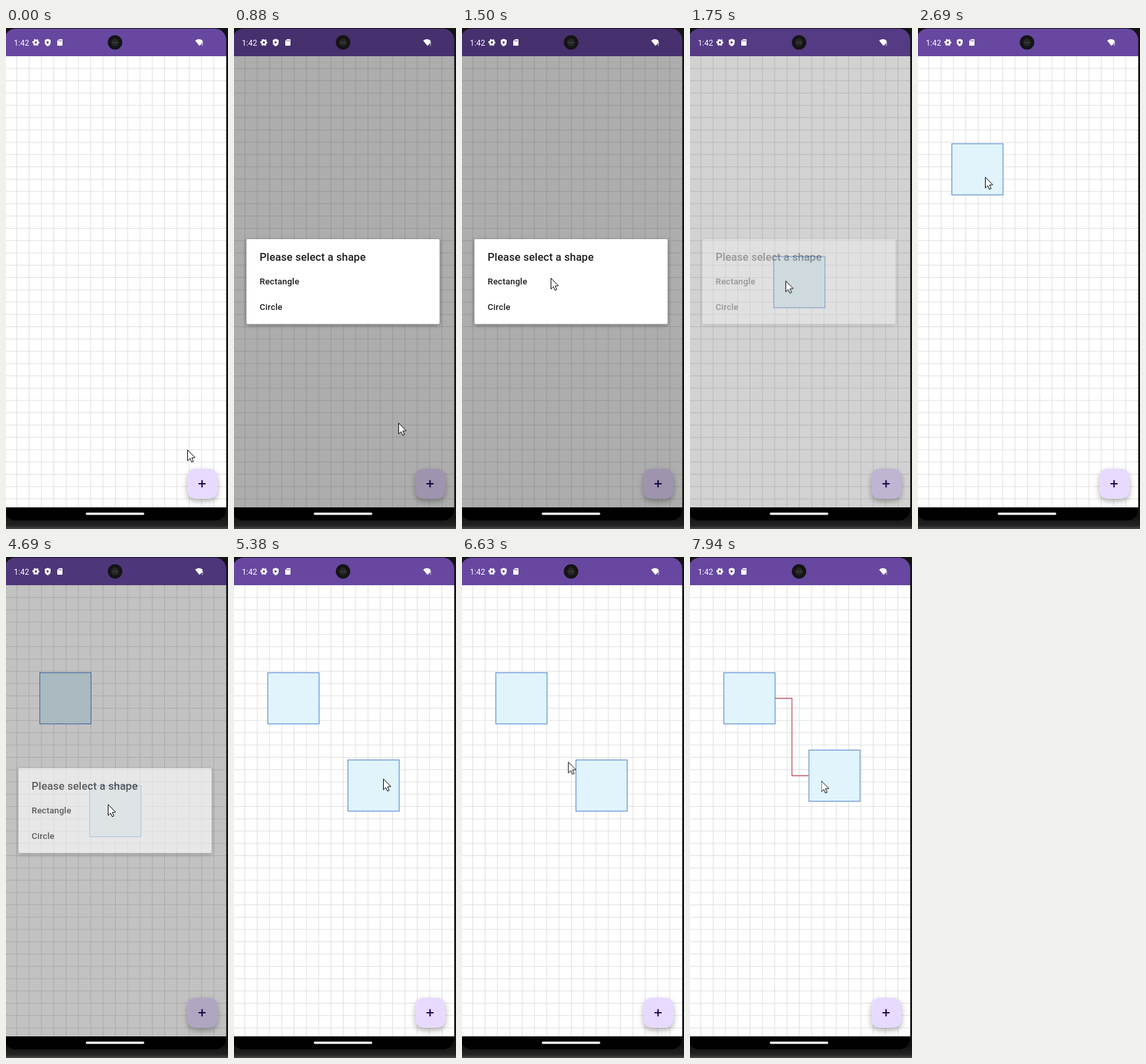
Animation, 338 px wide and 764 px high, one loop 8000 ms. Source, as an HTML page:

```html
<!DOCTYPE html>
<html lang="en">
<head>
<meta charset="utf-8">
<title>Shape editor</title>
<style>
html, body { margin: 0; width: 100%; height: 100%; overflow: hidden; background: #161616; }
svg { display: block; width: 338px; height: 764px; }
text { font-family: Roboto, sans-serif; }

.box { fill: #e1f4fc; stroke: #6793d4; stroke-width: 1.3; }
#grid { stroke: #dfdfdf; stroke-width: 1; }
#dialog text { fill: #1d1d1f; font-weight: 500; }
.title { font-size: 16.4px; letter-spacing: .1px; }
.item { font-size: 13.1px; letter-spacing: .2px; }
#fab { filter: drop-shadow(0 4px 4px rgba(0, 0, 0, .3)); }
#dialog { filter: drop-shadow(0 2px 3px rgba(0, 0, 0, .35)); }
#link { fill: none; stroke: #c2525c; stroke-width: 1.3; }

#scrim, #dialog, #first, #second, #link, #cursor { animation: 8s linear infinite; }
#scrim { animation-name: scrim; }
#dialog { animation-name: dialog; }
#first { animation-name: first; }
#second { animation-name: second; }
#link { animation-name: link; }
#cursor { animation-name: cursor; }
#first, #second, #link, #cursor { animation-timing-function: ease-in-out; }

@keyframes scrim {
  0%, 6.8% { opacity: 0; }
  9.5%, 20.6% { opacity: .32; }
  23.5%, 43.6% { opacity: 0; }
  46.3%, 57.9% { opacity: .32; }
  60.8%, 100% { opacity: 0; }
}
@keyframes dialog {
  0%, 6.8% { opacity: 0; }
  9%, 20.6% { opacity: 1; }
  22.5%, 43.6% { opacity: 0; }
  45.8%, 57.9% { opacity: 1; }
  59.8%, 100% { opacity: 0; }
}
@keyframes first {
  0%, 20.59% { transform: translate(127px, 348px); visibility: hidden; }
  20.6%, 25.5% { transform: translate(127px, 348px); visibility: visible; }
  32.5%, 100% { transform: translate(51px, 176px); visibility: visible; }
}
@keyframes second {
  0%, 57.89% { transform: translate(127px, 348px); visibility: hidden; }
  57.9%, 61.5% { transform: translate(127px, 348px); visibility: visible; }
  67.2%, 88% { transform: translate(173px, 309px); visibility: visible; }
  94% { transform: translate(196px, 322px); visibility: visible; }
  99.2%, 100% { transform: translate(180.5px, 294px); visibility: visible; }
}
@keyframes link {
  0%, 86.89% { d: path("M130 215.5H151.5V348.5H173"); visibility: hidden; }
  86.9%, 88% { d: path("M130 215.5H151.5V348.5H173"); visibility: visible; }
  94% { d: path("M130 215.5H163V361.5H196"); visibility: visible; }
  99.2%, 100% { d: path("M130 215.5H155.25V333.5H180.5"); visibility: visible; }
}
@keyframes cursor {
  0% { transform: translate(276px, 643px); }
  5%, 7.5% { transform: translate(296px, 690px); }
  17%, 20.8% { transform: translate(135px, 381px); }
  24%, 25.5% { transform: translate(178px, 399px); }
  32.5%, 34% { transform: translate(102px, 227px); }
  41.5% { transform: translate(298px, 690px); }
  45% { transform: translate(298px, 690px); animation-timing-function: ease-in; }
  49.25% { transform: translate(253px, 549px); animation-timing-function: ease-out; }
  55%, 59.2% { transform: translate(155px, 377px); }
  61%, 61.5% { transform: translate(181px, 377px); }
  67.2%, 69% { transform: translate(227px, 338px); }
  76%, 78% { transform: translate(95px, 217px); }
  86%, 88% { transform: translate(192px, 356px); }
  94% { transform: translate(215px, 369px); }
  99.2%, 100% { transform: translate(199.5px, 341px); }
}
</style>
</head>
<body>
<svg viewBox="0 0 338 764">
  <defs>
    <linearGradient id="rim" x2="0" y2="1">
      <stop offset="0" stop-color="#101010"/>
      <stop offset=".75" stop-color="#242424"/>
      <stop offset="1" stop-color="#4a4a4a"/>
    </linearGradient>
    <clipPath id="screen"><rect x="-2.25" width="337.5" y="1" height="750" rx="17"/></clipPath>
  </defs>

  <rect width="338" height="764" fill="#141414"/>
  <rect y="744" width="338" height="20" fill="url(#rim)"/>

  <g clip-path="url(#screen)">
    <rect x="-3" width="340" height="752" fill="#000"/>
    <rect x="-3" y="43" width="340" height="688" fill="#fff"/>
    <path id="grid"/>
    <rect x="-3" width="340" height="43" fill="#6747a0"/>
    <rect id="first" class="box" x=".5" y=".5" width="78" height="78"/>
    <path id="link" d="M130 215.5H151.5V348.5H173"/>
    <rect id="second" class="box" x=".5" y=".5" width="78" height="78"/>
    <g id="fab">
      <rect x="276" y="672" width="46" height="46" rx="13" fill="#e8daff"/>
      <path d="M293 695H304M298.5 689.5V700.5" stroke="#20085c" stroke-width="2.2"/>
    </g>
    <rect id="scrim" x="-3" width="340" height="731"/>

    <g id="status" fill="#fff">
      <text x="12" y="26.5" font-size="12">1:42</text>
      <g transform="translate(45.5 22)">
        <circle r="3" fill="none" stroke="#fff" stroke-width="2.6"/>
        <circle r="4.5" fill="none" stroke="#fff" stroke-width="1.7" stroke-dasharray="2.6 2.112" stroke-dashoffset="1.3"/>
      </g>
      <path d="M63.5 16.5L68 18.3V22C68 25 66 27 63.5 28C61 27 59 25 59 22V18.3Z"/>
      <path d="M62 19.8L66 22L62 24.3Z" fill="#553a88"/>
      <path d="M80.8 17H85.2Q86 17 86 17.8V26.2Q86 27 85.2 27H78.8Q78 27 78 26.2V19.8Z"/>
      <path d="M80.6 18.5V20.5M82.4 18.5V20.5M84.2 18.5V20.5" stroke="#553a88" stroke-width=".9"/>
      <path d="M288 19.3Q293.7 14.8 299.5 19.3L298 21V24L294.5 27.3Z"/>
      <path d="M299 20.5V24.5M299 25.7V27" stroke="#fff" stroke-width="1.3"/>
    </g>

    <g id="dialog">
      <rect x="19" y="322" width="294" height="129.5" rx="2" fill="#fff"/>
      <text class="title" x="39" y="354.8">Please select a shape</text>
      <text class="item" x="39" y="390.8">Rectangle</text>
      <text class="item" x="39" y="430">Circle</text>
    </g>
    <rect x="121.5" y="739" width="89" height="3.6" rx="1.8" fill="#fff"/>
  </g>

  <g id="camera">
    <circle cx="166" cy="22" r="11" fill="#141414"/>
    <circle cx="166" cy="22" r="6" fill="#262626"/>
    <circle cx="164" cy="22.3" r=".8" fill="#777"/>
    <circle cx="168" cy="22.3" r=".8" fill="#777"/>
  </g>

  <path id="cursor" d="M.5 .5V17L4.2 13.5L6.7 19L9.3 17.9L6.9 12.5L11.8 12Z" fill="#fff" stroke="#000" stroke-width="1" stroke-linejoin="round"/>
</svg>
<script>
const step = 18.75;
let d = "";
for (let x = -2.25 + step; x < 335; x += step) d += `M${x} 43V731`;
for (let y = 43 + step; y < 731; y += step) d += `M0 ${y}H335`;
document.getElementById("grid").setAttribute("d", d);
</script>
</body>
</html>
```
